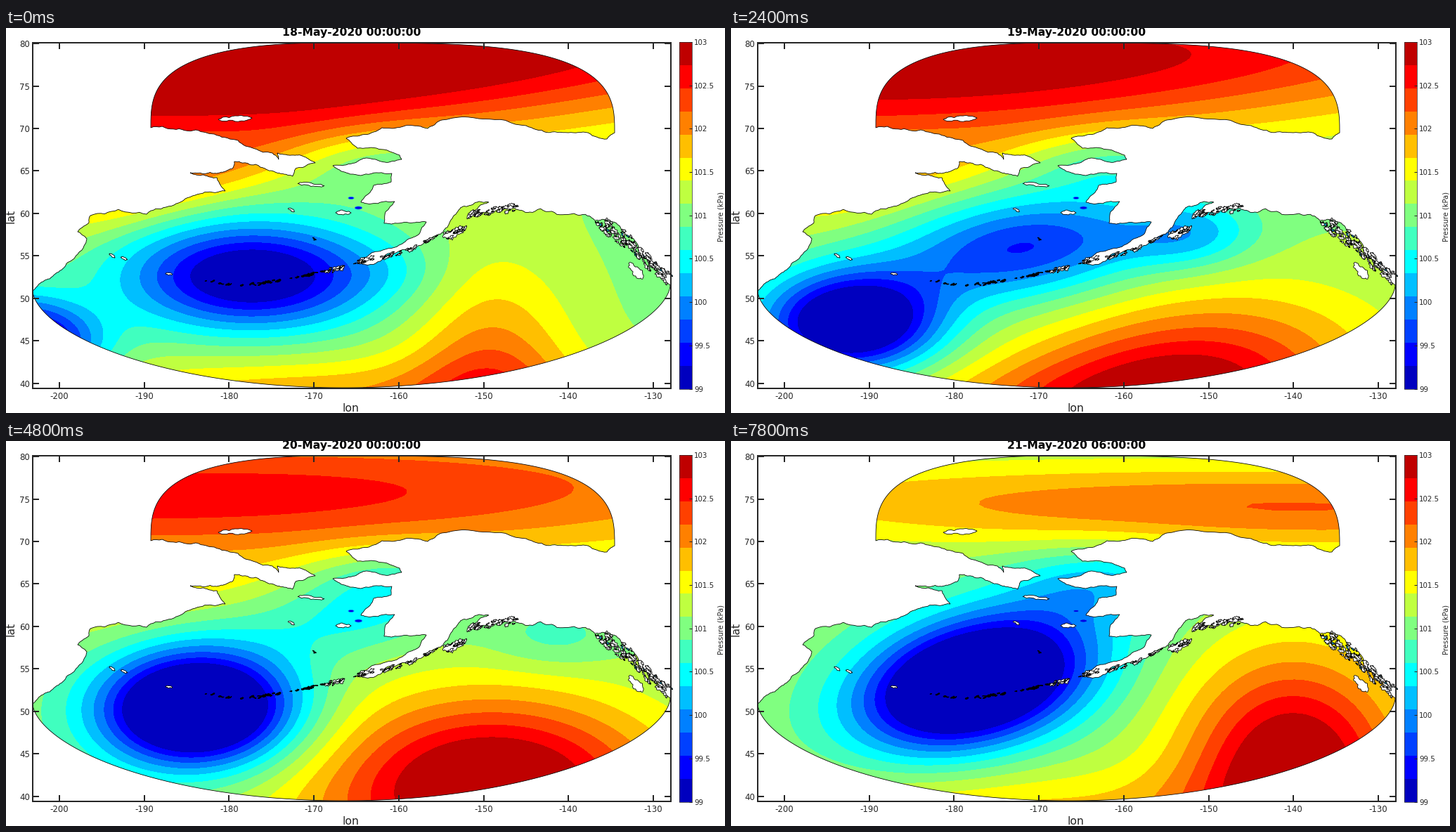
These frames come from a looping animation (1023x548 px, 8000 ms). A matplotlib script:

```python
import numpy as np
import matplotlib.pyplot as plt
from matplotlib.animation import FuncAnimation
from matplotlib.patches import Ellipse, Polygon, Rectangle

W, H, DPI = 1023, 548, 128
PX = 72 / DPI
INK = "#262626"
STEPS = 14  # six-hour steps, 600 ms each
rng = np.random.default_rng(5)
plt.rcParams["font.family"] = "DejaVu Sans"

# Pressure systems, in colour bands above or below the mean.
# Each track maps a step to (x, y, x radius, y radius, tilt, strength).
MEAN = 7.8
BERING_LOW = {
    0: (350, 353, 175, 76, 0, -8.8),
    1: (350, 347, 185, 78, 0, -8.9),
    3: (392, 326, 180, 70, 0, -7.3),
    5: (440, 300, 190, 75, -0.25, -4.6),
    7: (500, 262, 150, 55, -0.2, -2.6),
    10: (510, 225, 120, 50, 0, -1.2),
}
PACIFIC_LOW = {
    0: (40, 440, 95, 55, 0.2, -8),
    1: (85, 432, 105, 58, 0.1, -9),
    3: (147, 425, 113, 66, 0, -9.5),
    5: (200, 415, 130, 76, 0, -11.2),
    7: (257, 390, 125, 80, 0, -12.7),
    10: (303, 363, 150, 82, -0.06, -14),
    13: (347, 343, 163, 88, -0.25, -13),
}
GULF_LOW = {
    0: (550, 345, 80, 45, 0, -0.6),
    3: (620, 308, 90, 48, -0.1, -3),
    5: (690, 282, 95, 48, 0, -3),
    7: (770, 280, 95, 45, 0, -2.2),
    10: (800, 280, 95, 45, 0, 0),
}
PACIFIC_HIGH = {
    0: (690, 515, 115, 175, 0, 4),
    1: (725, 515, 130, 190, 0, 4),
    3: (640, 520, 270, 115, -0.25, 6),
    5: (615, 510, 235, 125, -0.1, 7.5),
    7: (670, 490, 245, 118, 0, 8),
    10: (735, 488, 210, 138, 0, 8.8),
    13: (800, 470, 155, 162, 0, 8),
}
ARCTIC_HIGH = {
    0: (450, 60, 900, 108, -0.09, 7.8),
    3: (400, 55, 850, 108, -0.09, 7.4),
    5: (300, 62, 900, 108, -0.05, 6.6),
    7: (200, 75, 1000, 105, -0.03, 6.2),
    10: (350, 85, 970, 80, 0, 4.9),
    13: (800, 93, 860, 60, 0.01, 4.2),
}
SOUTH_RIDGE = {
    0: (450, 540, 400, 70, 0, 3.5),
    3: (450, 540, 400, 70, 0, 3),
    5: (450, 540, 400, 70, 0, 0.5),
    10: (450, 540, 400, 70, 0, 0.8),
    13: (400, 540, 400, 75, 0, 2.7),
}
SIBERIA_RIDGE = {
    0: (220, 228, 200, 45, -0.3, 2.3),
    13: (220, 228, 200, 45, -0.3, 0),
}
STRAIT_TROUGH = {0: (540, 190, 130, 45, 0, -2)}
SYSTEMS = [BERING_LOW, PACIFIC_LOW, GULF_LOW, PACIFIC_HIGH, ARCTIC_HIGH,
           SOUTH_RIDGE, SIBERIA_RIDGE, STRAIT_TROUGH]

# Key points of the coasts; the detail between them is random
GULF = [(945, 366), (920, 336), (893, 300), (858, 273), (838, 274), (808, 264), (745, 262),
        (715, 258), (690, 264), (656, 272), (661, 262), (687, 248), (650, 254), (632, 275),
        (605, 299), (555, 320), (500, 335), (500, 331), (530, 318)]
ALASKA = [(530, 318), (570, 302), (588, 293), (598, 276), (580, 277), (538, 278), (540, 262),
          (553, 247), (505, 248), (523, 224), (548, 219), (549, 207), (490, 208), (465, 196),
          (500, 190), (512, 185), (545, 191), (563, 187), (560, 181), (500, 171), (484, 157),
          (535, 142), (580, 139), (600, 143), (620, 131), (740, 139), (800, 149), (855, 158), (866, 149)]
SIBERIA = [(206, 142), (270, 145), (330, 160), (379, 178), (388, 187), (386, 178), (415, 181),
           (440, 192), (412, 200), (408, 211), (370, 201), (338, 192), (325, 190), (322, 200),
           (300, 207), (262, 206), (300, 213), (312, 232), (255, 243), (200, 265), (120, 267),
           (118, 277), (102, 290), (115, 300), (102, 322), (70, 350), (38, 374)]


def state(track, step):
    return [np.interp(step, list(track), column) for column in zip(*track.values())]


def bump(x, y, cx, cy, rx, ry, tilt, strength):
    c, s = np.cos(tilt), np.sin(tilt)
    u = ((x - cx) * c + (y - cy) * s) / rx
    v = ((y - cy) * c - (x - cx) * s) / ry
    return strength * np.exp(-u * u - v * v)


def pressure(x, y, step):
    return MEAN + sum(bump(x, y, *state(track, step)) for track in SYSTEMS)


def south_edge():
    u = np.sin(np.linspace(-np.pi / 2, np.pi / 2, 160))
    return np.c_[491.5 + 453.5 * u, 370 - 4 * u + 142 * np.maximum(1 - u * u, 0) ** 0.58]


def north_edge():
    u = np.sin(np.linspace(np.pi / 2, -np.pi / 2, 160))
    return np.c_[536 + 330 * u, 145.5 + 3.5 * u - 124.5 * np.maximum(1 - abs(u) ** 3, 0) ** (1 / 3)]


def rough(points, amp=0.12, depth=3):
    """Ragged line by midpoint displacement."""
    p = np.array(points, float)
    for _ in range(depth):
        d = np.diff(p, axis=0)
        out = np.empty((2 * len(p) - 1, 2))
        out[::2] = p
        out[1::2] = p[:-1] + d / 2 + amp * rng.uniform(-1, 1, (len(d), 1)) * d[:, ::-1] * [1, -1]
        p = out
    return p


def jet(n=15):
    i = np.arange(1, n + 1)
    return np.stack([np.clip(np.minimum(i - a, a + 12 - i) / 4, 0, 1) for a in (6, 2, -2)], 1)


fig = plt.figure(figsize=(W / DPI, H / DPI), dpi=DPI, facecolor="white")
ax = fig.add_axes([0, 0, 1, 1])
ax.axis("off")


def line(x, y, width=1.0):
    ax.plot(x, y, color=INK, lw=width * PX, zorder=5, solid_capstyle="butt")


def label(x, y, text, size, ha="center", va="center", color=INK, **kw):
    return ax.text(x, y, text, fontsize=size * PX, ha=ha, va=va, color=color, zorder=6, **kw)


def island(x, y, rx, ry, tilt, face="white", width=0.8, ragged=0.3):
    a = np.linspace(0, 2 * np.pi, 9)
    e = np.c_[rx * np.cos(a), ry * np.sin(a)]
    c, s = np.cos(tilt), np.sin(tilt)
    outline = rough([x, y] + e @ np.array([[c, s], [-s, c]]), ragged, 2)
    ax.add_patch(Polygon(outline, fc=face, ec="black", lw=width * PX, zorder=3))


def chain(route, n, size, spread, tilt, face="white"):
    """Scatter small islands along a route."""
    p = np.array(route, float)
    for u in rng.uniform(0, len(p) - 1, n):
        k = int(u)
        x, y = p[k] + (u - k) * (p[k + 1] - p[k]) + rng.normal(0, spread, 2)
        r = size * rng.uniform(0.4, 1.3)
        island(x, y, r, 0.3 * r, tilt + rng.normal(0, 0.25), face, ragged=0.5)


# Sea: pressure bands clipped to the model domain
sea = np.vstack([south_edge(), rough(GULF, 0.14, 4), rough(ALASKA, 0.08, 4), north_edge(), rough(SIBERIA, 0.1, 4)])
shore = Polygon(sea, fc="none", ec="black", lw=0.8 * PX, zorder=3)
ax.add_patch(shore)

gx, gy = np.meshgrid(np.arange(30, 956, 4), np.arange(14, 522, 4))
bands = jet()
fills = []
for step in range(STEPS):
    z = np.clip(pressure(gx, gy, step), 0.01, 14.99)
    fill = ax.contourf(gx, gy, z, levels=range(16), colors=bands, zorder=1)
    fill.set_clip_path(shore)
    fills.append(fill)
ax.set(xlim=(0, W), ylim=(H, 0))

for x, y, w, h in [(491, 242, 8, 3), (501.5, 256, 10, 4)]:
    ax.add_patch(Ellipse((x, y), w, h, fc="#0000e6", ec="#0080ff", lw=0.8 * PX, zorder=2))

# Islands
island(326, 129, 24, 4, -0.04, ragged=0.1)
island(434, 223, 19, 2.5, 0.08, ragged=0.15)
island(480, 263, 11, 3, 0, ragged=0.15)
island(638, 292, 17, 6, -0.4)
island(896, 346, 15, 6, 0.85)
island(512, 329, 13, 3, -0.4)
for x, y, tilt in [(151, 324, 0.6), (168, 328, 0.4), (232, 350, 0.1), (406, 259, 0.5)]:
    island(x, y, 5, 1.5, tilt)
chain([(283, 361), (340, 366), (385, 360), (430, 352), (455, 346)], 40, 3, 0.8, -0.1, "black")
chain([(455, 347), (500, 335), (555, 322), (612, 297)], 46, 4.5, 1.5, -0.45)
chain([(625, 298), (652, 285)], 14, 4.5, 2, -0.5)
chain([(660, 267), (690, 260), (725, 255)], 30, 4.5, 2.5, -0.4)
chain([(850, 280), (895, 315), (942, 357)], 14, 4, 4, 0.8, "#00bfff")
chain([(850, 280), (895, 315), (942, 357)], 70, 5.5, 4.5, 0.85)
chain([(434, 297), (444, 304)], 3, 2, 0.5, 0.3, "black")

# Axes box and ticks
L, R, T, B = 38, 945.5, 21, 512.5
ax.add_patch(Rectangle((L, T), R - L, B - T, fc="none", ec=INK, lw=2 * PX, zorder=5))
for i in range(8):
    x = 76 + 120.7 * i
    line([x, x], [B, B - 9], 2)
    line([x, x], [T, T + 9], 2)
    label(x, 524, str(10 * i - 200), 11.7)
for i in range(9):
    y = 22.2 + 60.42 * i
    line([L, L + 9], [y, y], 2)
    line([R, R - 9], [y, y], 2)
    label(34, y, str(80 - 5 * i), 11.7, "right", "center_baseline")
label(491, 541, "lon", 15.7)
label(7, 268, "lat", 15.7, rotation=90)

# Colour bar
CL, CR, CT, CB = 957.5, 975.5, 20, 513.5
band = (CB - CT) / len(bands)
for i, color in enumerate(bands):
    ax.add_patch(Rectangle((CL, CB - band * (i + 1)), CR - CL, band, fc=color, ec="none", zorder=4, antialiased=False))
ax.add_patch(Rectangle((CL, CT), CR - CL, CB - CT, fc="none", ec=INK, lw=0.7 * PX, zorder=5))
for i in range(9):
    y = CB - (CB - CT) * i / 8
    line([CR - 4, CR], [y, y])
    label(979, y, f"{99 + i / 2:g}", 10.2, "left", "center_baseline")
label(1018, 268, "Pressure (kPa)", 10, rotation=90)

title = label(491.5, 11.5, "", 15.6, va="baseline", color="black", weight="bold")


def update(i):
    step = i // 3
    for s, fill in enumerate(fills):
        fill.set_visible(s == step)
    title.set_text(f"{18 + step // 4}-May-2020 {step % 4 * 6:02d}:00:00")
    return [title, *fills]


anim = FuncAnimation(fig, update, frames=40, interval=200, repeat=True, repeat_delay=0, blit=False)
plt.show()
```
